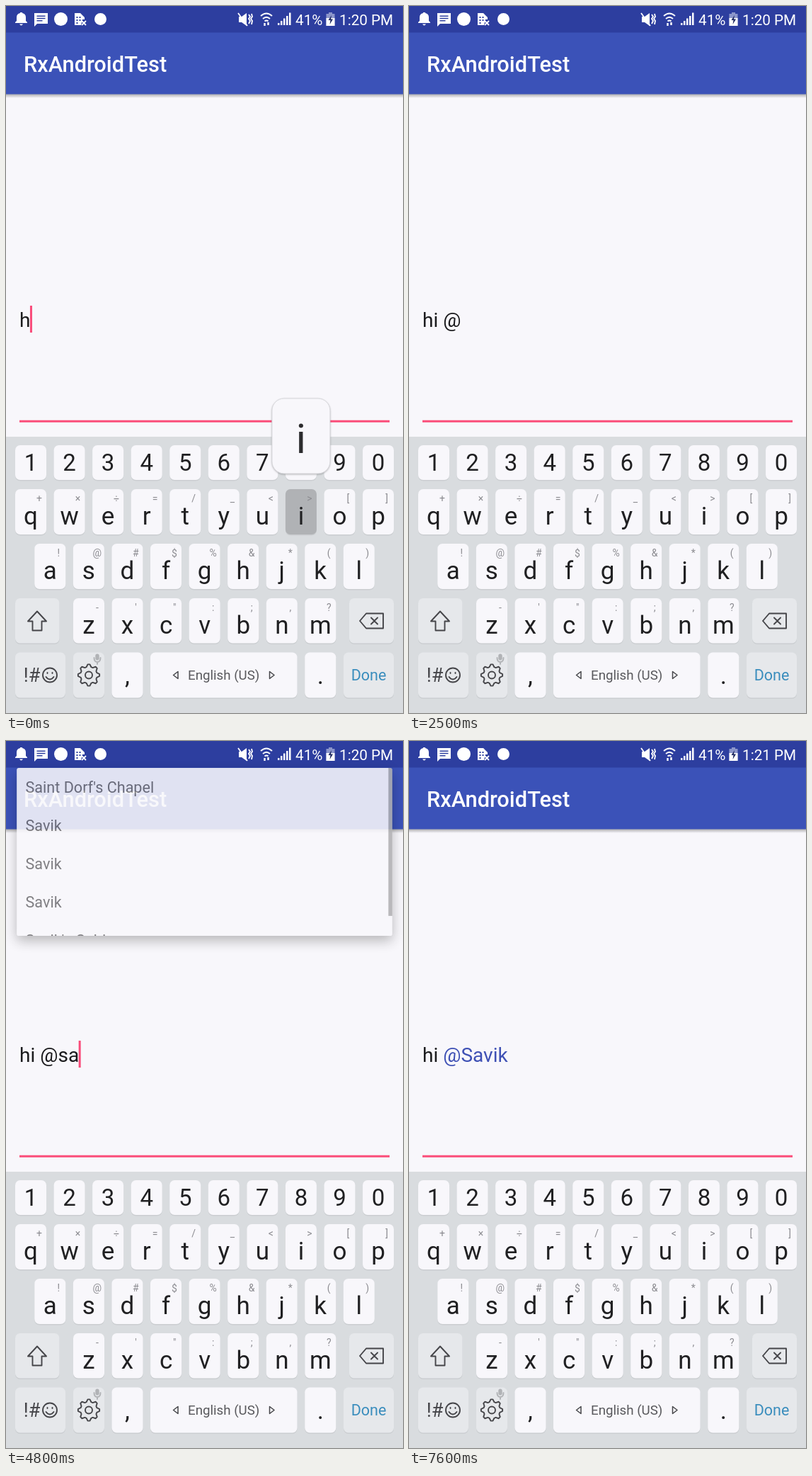
These frames come from a looping animation (561x998 px, 8000 ms). An HTML page:

```html
<!DOCTYPE html>
<html lang="en">
<head>
<meta charset="utf-8">
<title>Mention typing</title>
<style>
  html, body { margin: 0; width: 100%; height: 100%; overflow: hidden; background: #f8f7fb; }
  svg { display: block; width: 100%; height: 100%; font-family: Roboto, sans-serif; }
  text { white-space: pre; }
  .mid { text-anchor: middle; }
  .title { font-size: 30.8px; font-weight: 500; fill: #fff; }
  .status { font-size: 20.7px; fill: #fff; }
  .key .face { fill: #f8f7fb; }
  .key.soft .face { fill: #e6e8eb; }
  .key.down .face { fill: #b0b2b5; }
  .key .edge { fill: #cbced1; }
  .key text { fill: #202022; }
  .key .hint { font-size: 14px; fill: #8b8b90; }
  .line { fill: none; stroke: #454549; stroke-width: 1.9; stroke-linejoin: round; stroke-linecap: round; }
  #entry { font-size: 28.05px; fill: #1b1b1d; }
  #mention { fill: #3f51b5; }
  #bubble { filter: drop-shadow(0 1px 1px rgba(0, 0, 0, .25)); }
  #menu { transform-origin: 280.5px 38px; filter: drop-shadow(0 7px 9px rgba(0, 0, 0, .3)); }
  #menu text { font-size: 21.8px; fill: #6f6e72; }
</style>
</head>
<body>
<svg id="stage" viewBox="0 0 561 998" preserveAspectRatio="none">
  <defs>
    <linearGradient id="shade" x2="0" y2="1">
      <stop stop-color="#000" stop-opacity=".32"/>
      <stop offset="1" stop-color="#000" stop-opacity="0"/>
    </linearGradient>
    <clipPath id="menuClip"><rect x="12.5" y="38" width="536" height="239.5" rx="3"/></clipPath>
  </defs>

  <rect width="561" height="998" fill="#f8f7fb"/>
  <rect y="124" width="561" height="6" fill="url(#shade)"/>
  <rect y="37" width="561" height="87.5" fill="#3b52b8"/>
  <rect width="561" height="37.5" fill="#2d3e9f"/>
  <text class="title" x="25" y="93">RxAndroidTest</text>

  <g fill="#fff">
    <path d="M13 24v-1l2-2v-5q0-5 5-6v-1h3v1q5 1 5 6v5l2 2v1zM19 25.5h5q-2.500 4-5 0z"/>
    <path fill-rule="evenodd" d="M40 10h19v15H44l-4 4zM43.500 13.500v1.500h12v-1.500zm0 3.200v1.500h12v-1.500zm0 3.200v1.500h8v-1.500z"/>
    <circle cx="77.500" cy="18.500" r="9.500"/>
    <path fill-rule="evenodd" d="M97 10h8l6 6v3h-3l-2 8h-9zm2.500 5v2h2v-2zm4 0v2h2v-2zm-4 4v2h2v-2zm4 0v2h2v-2zm-4 4v2h2v-2z"/>
    <path d="M107 21l6 6m0-6l-6 6" stroke="#fff" stroke-width="1.800"/>
    <circle cx="133.500" cy="18.500" r="8.500"/>
    <path d="M329 15h4l7-5v18l-7-5h-4z"/>
    <path d="M384 24h2.500v3H384zm4-3h2.500v6H388zm4-3.500h2.500V27H392zm4-3.500h2.500v13H396zm4-4.500h2.500V27H400z"/>
    <path d="M456 9h5v2h3.500v17h-12V11h3.500z" opacity=".45"/>
    <path d="M452.500 17h12v11h-12z"/>
  </g>
  <path d="M460 13l-4.500 7h3l-1 6 4.500-7.500h-3z" fill="#1c2760"/>
  <g fill="none" stroke="#fff" stroke-width="2">
    <path d="M328 10l13 18M343 12l2 3-2 3 2 3-2 4M347 11l1 4-2 3 2 3-1 5" stroke-width="1.800"/>
    <path d="M360 14q8-7 16 0M363 18q5-4.500 10 0M365.500 21.500q2.500-2 5 0"/>
    <path d="M365.500 28v-4M370.500 23v4" stroke-width="2.400"/>
  </g>
  <text class="status" x="409" y="27">41%</text>
  <text class="status" id="clock" x="471" y="27"></text>

  <text id="entry" x="19" y="453"><tspan id="plain"></tspan><tspan id="mention"></tspan></text>
  <rect id="caret" y="423" width="3" height="38" fill="#f94c7a"/>
  <rect x="19" y="584.700" width="523" height="3" fill="#fb4d79"/>

  <rect y="608" width="561" height="390" fill="#d9dcdf"/>
  <g id="shared"></g>
  <g id="letters"></g>
  <g id="symbols"></g>

  <g id="bubble">
    <rect x="-41" width="82" height="106" rx="17" fill="#f8f7fb" stroke="#d6d6da"/>
    <text id="bubbleText" class="mid" y="77" font-size="58" fill="#2c2c2e"></text>
  </g>

  <g id="menu">
    <rect x="12.500" y="38" width="536" height="239.500" rx="3" fill="#f8f7fb"/>
    <g clip-path="url(#menuClip)">
      <rect id="touched" x="12" y="93.300" width="537" height="54.500" opacity=".1"/>
      <g id="rows"></g>
      <rect id="scrollbar" x="543" y="38" width="6" height="211"/>
    </g>
  </g>
</svg>

<script>
const LOOP = 8000, STEP = 100, PITCH = 54.56;
const $ = id => document.getElementById(id);
const keys = {};

function add(parent, tag, attrs = {}, content = '') {
  const node = document.createElementNS('http://www.w3.org/2000/svg', tag);
  for (const name in attrs) node.setAttribute(name, attrs[name]);
  node.textContent = content;
  return parent.appendChild(node);
}

function addKey(parent, id, x, y, w, h, soft) {
  const g = add(parent, 'g', { class: soft ? 'key soft' : 'key' });
  add(g, 'rect', { class: 'edge', x, y: y + 1.5, width: w, height: h, rx: 7 });
  add(g, 'rect', { class: 'face', x, y, width: w, height: h, rx: 7 });
  keys[id] = { g, x: x + w / 2, y };
  return g;
}

function addLabel(g, x, y, size, content, fill) {
  const label = add(g, 'text', { class: 'mid', x, y, 'font-size': size }, content);
  if (fill) label.style.fill = fill;
}

function addRow(parent, x, y, h, labels, hints = '', size = 35) {
  [...labels].forEach((label, i) => {
    const left = x + i * PITCH, center = left + 22;
    const g = addKey(parent, label, left, y, 44, h);
    addLabel(g, center, y + (h < 60 ? 36 : 49.5), size, label);
    if (hints[i]) add(g, 'text', { class: 'hint mid', x: center + 12, y: y + 18 }, hints[i]);
  });
}

function gearPath(cx, cy, teeth) {
  const points = [];
  for (let i = 0; i < teeth * 4; i++) {
    const angle = (i - 1.5) * Math.PI / teeth / 2 - Math.PI / 2;
    const radius = i % 4 === 1 || i % 4 === 2 ? 15.2 : 11.8;
    points.push(`${cx + radius * Math.cos(angle)} ${cy + radius * Math.sin(angle)}`);
  }
  return `M${points.join('L')}Z`;
}

function buildKeyboard() {
  const shared = $('shared'), letters = $('letters'), symbols = $('symbols');
  const icon = (g, d) => add(g, 'path', { class: 'line', d });

  addRow(shared, 13, 620, 49, '1234567890', '', 33);
  addRow(letters, 13, 682, 64, 'qwertyuiop', '+×÷=/_<>[]');
  addRow(letters, 40.3, 759, 64, 'asdfghjkl', '!@#$%&*()');
  addRow(letters, 95, 836, 63.5, 'zxcvbnm', '-\'":;,?');
  addRow(symbols, 13, 682, 64, '+×÷=/_<>[]', '', 31);
  addRow(symbols, 13, 759, 64, '!@#$%^&*()', '', 31);
  addRow(symbols, 95, 836, 63.5, '-\'":;,?', '', 31);

  icon(addKey(letters, 'shift', 13, 836, 62.5, 63.5, true),
    'M44 854.500L57 868.500H50.500V881.500H37.500V868.500H31Z');
  addLabel(addKey(symbols, 'more', 13, 836, 62.5, 63.5, true), 44, 876, 23, '1/2', '#454549');
  icon(addKey(shared, 'erase', 485, 836, 63, 63.5, true),
    'M500 868L509 857.500H533V878.500H509ZM516 863.500l9 9m0-9l-9 9');

  addKey(shared, 'mode', 13, 912.5, 71, 64, true);
  const gear = addKey(shared, 'settings', 95, 912.5, 44, 64, true);
  icon(gear, gearPath(117, 944.5, 8));
  add(gear, 'circle', { class: 'line', cx: 117, cy: 944.5, r: 5 });
  add(gear, 'rect', { x: 126.3, y: 914.5, width: 5.4, height: 9, rx: 2.7, fill: '#b1b3b6' });
  icon(gear, 'M124.500 920q0 6 4.500 6t4.500-6M129 926v3').style.stroke = '#b1b3b6';

  addLabel(addKey(shared, 'comma', 149.5, 912.5, 44, 64), 171.5, 957, 35, ',');
  const space = addKey(shared, 'space', 204, 912.5, 207.5, 64);
  addLabel(space, 307.7, 951, 18.7, 'English (US)', '#59595d');
  icon(space, 'M243 939.500V949.500L236.500 944.500ZM372.500 939.500V949.500L379 944.500Z').style.strokeWidth = 1.5;
  addLabel(addKey(shared, 'period', 422.3, 912.5, 44, 64), 444.3, 957, 35, '.');
  addLabel(addKey(shared, 'done', 477, 912.5, 71, 64, true), 512.5, 952, 21.5, 'Done', '#3a8dbd');

  // The mode key has one face per keyboard page.
  const toSymbols = add(letters, 'g');
  addLabel(toSymbols, 36.5, 954, 27, '!#', '#454549');
  add(toSymbols, 'circle', { class: 'line', cx: 62, cy: 944.5, r: 10 });
  icon(toSymbols, 'M56.500 947q5.500 7 11 0M58.500 941v1M65.500 941v1');
  addLabel(symbols, 48.5, 952.5, 23, 'ABC', '#454549');
}

const texts = [
  { at: 0, plain: 'h' }, { at: 100, plain: 'hi' }, { at: 600, plain: 'hi ' },
  { at: 1800, plain: 'hi @' }, { at: 3100, plain: 'hi @s' }, { at: 3500, plain: 'hi @sa' },
  { at: 7100, plain: 'hi ', mention: '@Savik' },
];

const presses = [
  { key: 'i', from: 0, to: 100, bubbleTo: 200 },
  { key: 'space', from: 500, to: 600 },
  { key: 'mode', from: 900, to: 1200 },
  { key: '@', from: 1600, to: 1800, bubbleTo: 1800 },
  { key: 'mode', from: 2300, to: 2500 },
  { key: 's', from: 3000, to: 3100, bubbleTo: 3200 },
  { key: 'a', from: 3400, to: 3500, bubbleTo: 3500 },
];

const clamp = v => Math.min(1, Math.max(0, v));
const show = (node, on) => node.style.display = on ? '' : 'none';

function drawEntry(t) {
  const { at, plain, mention = '' } = texts.findLast(entry => entry.at <= t);
  $('plain').textContent = plain;
  $('mention').textContent = mention;
  $('caret').setAttribute('x', 19 + $('entry').getComputedTextLength() - .5);
  show($('caret'), (t - at) % 1000 < 500);
}

function drawKeyboard(t) {
  const onSymbols = t >= 1200 && t < 2500;
  show($('symbols'), onSymbols);
  show($('letters'), !onSymbols);
  for (const { key } of presses) keys[key].g.classList.remove('down');
  show($('bubble'), false);
  for (const { key, from, to, bubbleTo = 0 } of presses) {
    if (t < from) continue;
    if (t < to) keys[key].g.classList.add('down');
    if (t < bubbleTo) {
      $('bubble').setAttribute('transform', `translate(${keys[key].x} ${keys[key].y - 128})`);
      $('bubbleText').textContent = key;
      show($('bubble'), true);
    }
  }
}

function drawMenu(t) {
  const entered = 1 - (1 - clamp((t - 4500) / 400)) ** 1.5;
  const presence = entered * (1 - clamp((t - 7000) / 400));
  show($('menu'), presence > 0);
  $('menu').style.opacity = presence;
  $('menu').style.transform = `scale(${.92 + .08 * presence})`;
  $('scrollbar').setAttribute('opacity', .29 * (1 - clamp((t - 6100) / 500)));
  show($('touched'), t >= 6900);
}

function draw(now) {
  const t = Math.floor(now % LOOP / STEP) * STEP;
  $('clock').textContent = t < 6200 ? '1:20 PM' : '1:21 PM';
  drawEntry(t);
  drawKeyboard(t);
  drawMenu(t);
}

buildKeyboard();
["Saint Dorf's Chapel", 'Savik', 'Savik', 'Savik', "Savik's Cabin"].forEach((name, i) =>
  add($('rows'), 'text', { x: 25, y: 73.7 + i * 54.5 }, name));

const start = performance.now();
function tick() {
  draw(performance.now() - start);
  requestAnimationFrame(tick);
}
tick();
</script>
</body>
</html>
```
